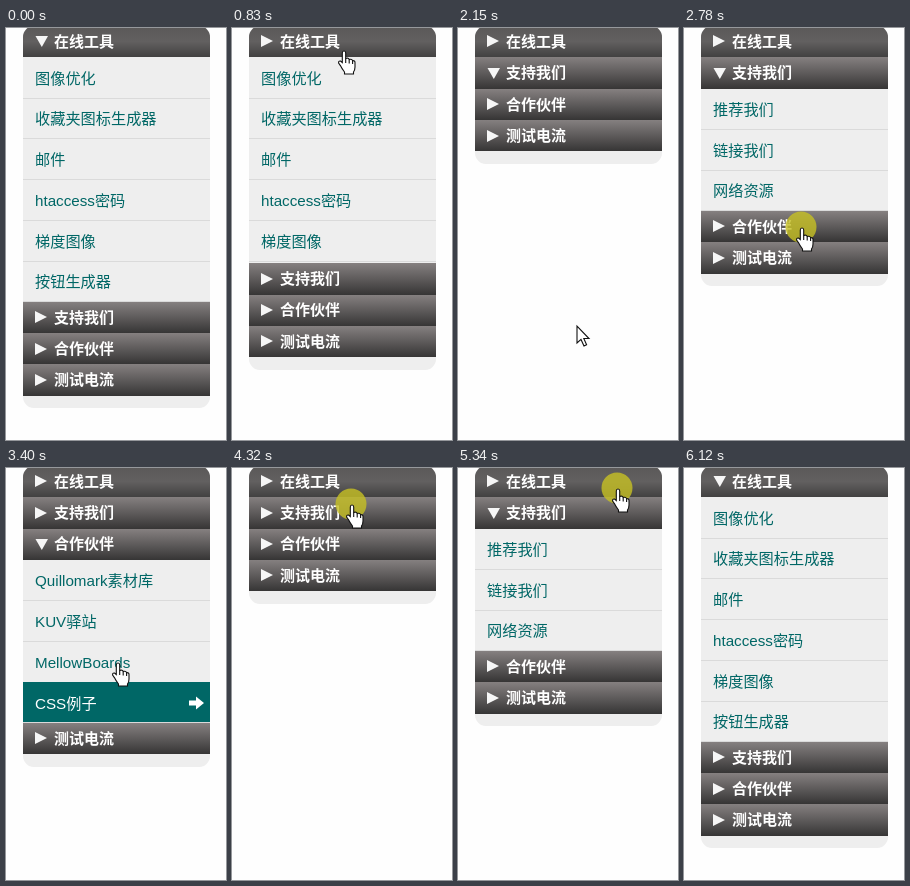
An HTML page with a canvas that plays this animation: 220 px wide and 412 px high, repeating every 6.59 s.

```html
<!DOCTYPE html>
<html lang="zh-CN">
<head>
<meta charset="utf-8">
<style>
html, body { margin: 0; width: 100%; height: 100%; overflow: hidden; background: #fefefe; }
canvas { display: block; }
</style>
</head>
<body>
<canvas width="220" height="412"></canvas>
<script>
const ctx = document.querySelector('canvas').getContext('2d');
const LOOP = 6590, STEP = 69.5;
const LEFT = 17, WIDTH = 187, TOP = -2.05, HEAD = 31.33, ROW = 40.75, FOOT = 12.7;
const FONTS = '"Liberation Sans", Arial, "Noto Sans CJK SC", "Noto Sans CJK", sans-serif';

const menu = [
  ['在线工具', ['图像优化', '收藏夹图标生成器', '邮件', 'htaccess密码', '梯度图像', '按钮生成器']],
  ['支持我们', ['推荐我们', '链接我们', '网络资源']],
  ['合作伙伴', ['Quillomark素材库', 'KUV驿站', 'MellowBoards', 'CSS例子']],
  ['测试电流', []]
];

// [time, panel, opens]
const toggles = [
  [-500, 0, true], [782, 0, false], [1045, 0, true], [2150, 1, true],
  [2880, 2, true], [3800, 2, false], [4500, 1, true], [5505, 0, true]
];

// [time, x, y] of the pointer tip
const path = [
  [69, 140, 275], [690, 114, 24], [834, 112, 23], [1000, 112, 19], [1580, 113, 19],
  [1990, 119, 298], [2155, 119, 298], [2750, 118, 200], [2900, 118, 200],
  [3200, 110, 270], [3680, 115, 78], [3850, 115, 78], [4180, 119, 40],
  [4300, 120, 37], [4450, 120, 37], [4930, 195, 110], [5270, 160, 21],
  [5480, 160, 21], [6110, 150, 415]
];

const presses = [[620, 700], [970, 1040], [1980, 2140], [2760, 2850],
  [3690, 3790], [4300, 4450], [5270, 5440]];

const hand = new Path2D('M-1.7 2Q-1.7 0 0 0Q1.7 0 1.7 2V7.5Q4.5 6.4 5.2 8.6Q7.8 7.6 8.6 9.6' +
  'Q11 9.4 11 11.5V16Q11 19 9.5 21V23H.5V21Q-2 18 -3.6 14.6L-5.4 12Q-5.6 9.6 -3.5 10L-1.7 11.5Z');
const fingers = new Path2D('M1.7 7.5V12M5.2 8.6V12.5M8.6 9.6V13');
const arrow = new Path2D('M0 0V17L4 13.4L7 20L9.6 18.8L6.8 12.5H12Z');
const down = new Path2D('M29.5 -5H42L35.8 6Z');
const right = new Path2D('M29 -6L41 0L29 6Z');
const goIcon = new Path2D('M183 -2.5H190V-6.5L198 0L190 6.5V2.5H183Z');

function pointerAt(t) {
  const i = path.findIndex(key => key[0] > t);
  if (i < 1) return null;
  const [t0, x0, y0] = path[i - 1], [t1, x1, y1] = path[i];
  const p = (t - t0) / (t1 - t0), e = p * p * (3 - 2 * p);
  return { x: x0 + (x1 - x0) * e, y: y0 + (y1 - y0) * e };
}

function panelAt(t) {
  const [start, index, opens] = toggles.filter(event => event[0] <= t).pop();
  const p = Math.min(1, (t - start) / 200);
  const swing = 0.5 - Math.cos(Math.PI * p) / 2;
  return { index, opens, height: menu[index][1].length * ROW * (opens ? swing : 1 - swing) };
}

function fill(shape, color, x = 0, y = 0, outline) {
  ctx.save();
  ctx.translate(x, y);
  ctx.fillStyle = color;
  ctx.fill(shape);
  if (outline) ctx.stroke(shape);
  ctx.restore();
}

function label(text, x, baseline, color, font) {
  ctx.font = font + ' ' + FONTS;
  ctx.fillStyle = color;
  ctx.fillText(text, x, Math.round(baseline));
}

function drawHeader(title, y, opened, first) {
  const top = Math.round(y), bottom = Math.round(y + HEAD);
  const shade = ctx.createLinearGradient(0, top, 0, bottom);
  const colors = first ? ['#5a5858', '#626060', '#424141'] : ['#858080', '#5e5b5b', '#363535'];
  colors.forEach((color, i) => shade.addColorStop(i / 2, color));
  ctx.fillStyle = shade;
  ctx.fillRect(LEFT, top, WIDTH, bottom - top);
  const middle = y + HEAD / 2;
  fill(opened ? down : right, '#f6f6f6', 0, Math.round(middle - 0.2));
  label(title, 48, middle + 5.1, '#fff', 'bold 15px');
}

function drawRows(rows, y, height, pointer) {
  ctx.save();
  ctx.beginPath();
  ctx.rect(LEFT, Math.round(y), WIDTH, Math.round(y + height) - Math.round(y));
  ctx.clip();
  rows.forEach((text, i) => {
    const top = y + i * ROW, middle = top + ROW / 2;
    const start = Math.round(top), end = Math.floor(top + ROW);
    const hover = pointer && pointer.x > LEFT && pointer.x < LEFT + WIDTH &&
      pointer.y >= top && pointer.y < Math.min(top + ROW, y + height);
    if (hover) {
      ctx.fillStyle = '#006766';
      ctx.fillRect(LEFT, start, WIDTH, end - start);
      fill(goIcon, '#fff', 0, Math.round(middle));
    }
    ctx.fillStyle = '#dadada';
    ctx.fillRect(LEFT, end, WIDTH, 1);
    label(text, 29, middle + 6, hover ? '#fff' : '#006766', '15.2px');
  });
  ctx.restore();
}

function drawPointer(t, bottom) {
  const pointer = pointerAt(t);
  if (!pointer) return;
  const x = Math.round(pointer.x), y = Math.round(pointer.y);
  if (presses.some(([from, to]) => t >= from && t < to)) {
    ctx.fillStyle = 'rgba(196,190,36,.82)';
    ctx.beginPath();
    ctx.arc(x - 1, y - 1, 15.5, 0, 7);
    ctx.fill();
  }
  const overLink = y < bottom && x > LEFT && x < LEFT + WIDTH;
  ctx.strokeStyle = '#111';
  ctx.lineWidth = 1.1;
  fill(overLink ? hand : arrow, '#fff', x, y, true);
  if (overLink) {
    ctx.translate(x, y);
    ctx.stroke(fingers);
    ctx.translate(-x, -y);
  }
}

function draw(t) {
  const panel = panelAt(t), linksEnd = TOP + 4 * HEAD + panel.height;
  ctx.fillStyle = '#fefefe';
  ctx.fillRect(0, 0, 220, 412);
  ctx.save();
  ctx.beginPath();
  ctx.roundRect(LEFT, TOP, WIDTH, Math.round(linksEnd + FOOT) - TOP, 11);
  ctx.clip();
  ctx.fillStyle = '#eee';
  ctx.fillRect(0, 0, 220, 412);
  let y = TOP;
  menu.forEach(([title, rows], i) => {
    const current = i === panel.index;
    drawHeader(title, y, current && panel.opens, i === 0);
    y += HEAD;
    if (current) {
      drawRows(rows, y, panel.height, pointerAt(t - STEP));
      y += panel.height;
    }
  });
  ctx.restore();
  drawPointer(t, linksEnd);
}

function tick() {
  const t = performance.now() % LOOP;
  draw(Math.floor(t / STEP + 0.12) * STEP);
  requestAnimationFrame(tick);
}
tick();
</script>
</body>
</html>
```
